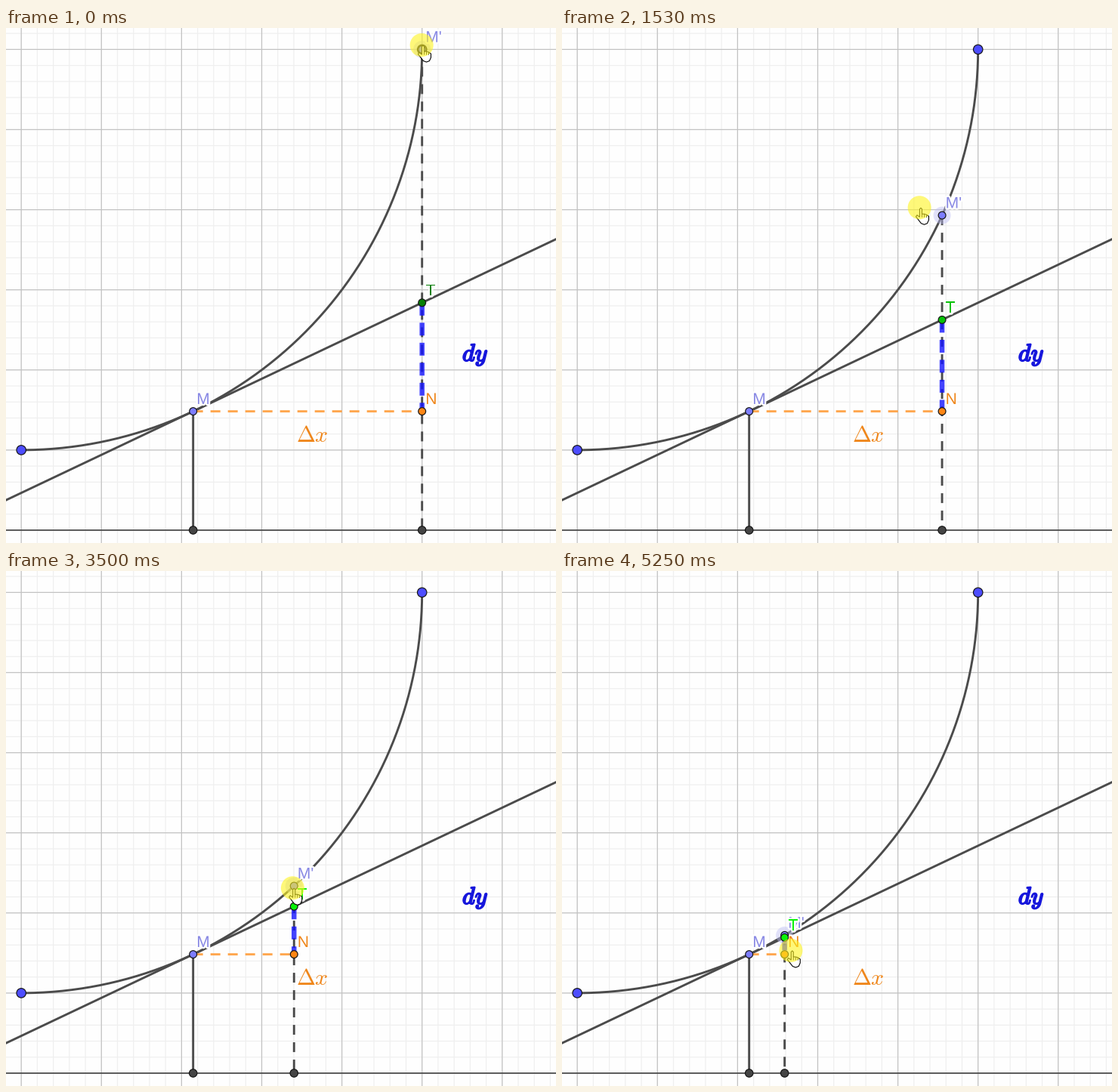
A matplotlib script that plays this animation: 728 by 682 pixels, repeating every 5320 ms.

```python
import numpy as np
import matplotlib.pyplot as plt
from matplotlib.animation import FuncAnimation
from matplotlib.patches import Circle, Polygon
from matplotlib.patheffects import withStroke

W, H, DPI = 728, 682, 64
PT = 72 / DPI                     # points per pixel
LOOP, TICK, STEPS = 5320, 40, 73

plt.rcParams.update({
    "font.family": "Liberation Sans",
    "mathtext.fontset": "cm",
    "lines.scale_dashes": False,
    "toolbar": "None",
})

# Geometry: a quarter circle five units wide, with a tangent at M
UNIT = 106.1
CX, CY, R = 20.2, 28.4, 5 * UNIT
BASE = CY + 6 * UNIT
MX = 247.7
MY = CY + np.sqrt(R**2 - (MX - CX)**2)
SLOPE = -(MX - CX) / (MY - CY)

INK = "#4b4b4b"
BLUE = "#4d4dff"
VIOLET = "#7d7dff"
LABEL = "#8888e4"
ORANGE = "#ef861a"
NAVY = "#1616dc"
PAPER = "#fefefe"

# Pointer drag in polar form around the circle's centre
KEY_STEPS = (0, 9, 21, 31, 42, 55, 72)
KEY_ANGLES = (-0.017, 0.144, 0.427, 0.615, 0.759, 0.896, 1.027)
KEY_REACH = (530, 508, 499, 511, 522, 542, 552)
LEAD = 0.006                      # the pointer runs slightly ahead of the point

HAND = np.array([
    (0, 1.5), (1.5, 0), (3, 1.5), (3, 8), (6, 8), (9, 9), (12, 11),
    (12, 16), (10, 20.5), (6, 22), (2, 20.5), (-5, 11.5), (-3.5, 9.5), (0, 12),
])

fig = plt.figure(figsize=(W / DPI, H / DPI), dpi=DPI, facecolor=PAPER)
ax = fig.add_axes([0, 0, 1, 1])
ax.set_xlim(0, W)
ax.set_ylim(H, 0)
ax.axis("off")


def line(xs, ys, color=INK, width=2.9, dash=None, **kw):
    style = (0, [d * PT for d in dash]) if dash else "-"
    return ax.plot(xs, ys, color=color, lw=width * PT, ls=style, snap=False, **kw)[0]


def dot(x, y, r, fill, z=6):
    return ax.add_patch(Circle((x, y), r, fc=fill, ec="#151515", lw=1.2 * PT, zorder=z))


def disc(r, color, alpha, z):
    return ax.add_patch(Circle((0, 0), r, fc=color, alpha=alpha, lw=0, zorder=z))


def label_spot(x, y):
    return x + 4.6, y - 9.7


def label(x, y, s, color):
    rim = [withStroke(linewidth=4.5 * PT, foreground=PAPER)]
    return ax.text(*label_spot(x, y), s, color=color, size=21 * PT,
                   path_effects=rim, zorder=5)


def draw_grid():
    for gap, color in ((UNIT / 5, "#efefef"), (UNIT, "#c2c2c2")):
        style = dict(color=color, lw=1.2 * PT, zorder=0, snap=False)
        ax.vlines(np.arange(CX % gap, W, gap), 0, H, **style)
        ax.hlines(np.arange(CY % gap, H, gap), 0, W, **style)
    line([0, W], [BASE, BASE], "#2a2a2a", 1.4, zorder=1)


draw_grid()

arc = np.linspace(0, np.pi / 2, 200)
line(CX + R * np.cos(arc), CY + R * np.sin(arc), zorder=2)
ends = np.array([-5, W + 5])
line(ends, MY + SLOPE * (ends - MX), zorder=2)
line([MX, MX], [MY, BASE], zorder=2)

dot(CX, CY + R, 6.2, BLUE)
dot(CX + R, CY, 6.2, BLUE)
dot(MX, MY, 4.9, VIOLET)
dot(MX, BASE, 5.2, "#444444")
label(MX, MY, "M", LABEL)

ax.text(384, 548.3, r"$\Delta x$", color=ORANGE, size=30 * PT, zorder=5)
ax.text(604, 441, "$dy$", color=NAVY, size=32 * PT, zorder=5,
        path_effects=[withStroke(linewidth=2 * PT, foreground=NAVY)])

# Moving parts
drop = line([], [], dash=(13, 10), zorder=2)
run = line([], [], "#ffa64d", dash=(13, 10), zorder=2)
rise = line([], [], "#0f0fff", 6.5, (17, 9.5), alpha=0.78, zorder=3)
glow = disc(11.5, "#bebef5", 0.45, 4)
foot = dot(0, 0, 5.2, "#444444")
p_dot = dot(0, 0, 4.9, VIOLET, 7)
n_dot = dot(0, 0, 4.9, "#ff8614", 7)
t_dot = dot(0, 0, 4.9, "green", 8)
p_text = label(0, 0, "M'", LABEL)
n_text = label(0, 0, "N", ORANGE)
t_text = label(0, 0, "T", "green")

hand = ax.add_patch(Polygon(HAND, fc="white", ec="black", lw=1.1 * PT,
                            joinstyle="round", zorder=10))
knuckles = [line([], [], "black", 0.9, zorder=10) for _ in range(3)]
spot = disc(15.5, "#fef420", 0.6, 11)


def place(mark, text, x, y):
    mark.set_center((x, y))
    text.set_position(label_spot(x, y))


def polar(angle, reach):
    return CX + reach * np.cos(angle), CY + reach * np.sin(angle)


def update(i):
    step = min(int((i * TICK + TICK / 2 + 5) * STEPS / LOOP), STEPS - 1)
    angle = np.interp(step, KEY_STEPS, KEY_ANGLES)
    x, y = polar(max(angle, 0), R)
    hx, hy = polar(angle + LEAD, np.interp(step, KEY_STEPS, KEY_REACH))
    ty = MY + SLOPE * (x - MX)

    drop.set_data([x, x], [y, BASE])
    run.set_data([MX, x], [MY, MY])
    rise.set_data([x, x], [ty, MY])
    foot.set_center((x, BASE))
    glow.set_center((x, y))
    place(p_dot, p_text, x, y)
    place(n_dot, n_text, x, MY)
    place(t_dot, t_text, x, ty)

    # T brightens over the first half of the drag
    green = (0.03, 0.5 + 0.45 * min(1, 2 * step / STEPS), 0.03)
    t_dot.set_facecolor(green)
    t_text.set_color(green)

    spot.set_center((hx, hy))
    hand.set_xy(HAND + (hx + 0.3, hy + 0.5))
    for k, mark in enumerate(knuckles):
        kx = hx + 3.3 + 3 * k
        mark.set_data([kx, kx], [hy + 8.5 + k * 0.6, hy + 12.5])
    return []


anim = FuncAnimation(fig, update, frames=LOOP // TICK, interval=TICK,
                     init_func=lambda: update(0), repeat=True,
                     repeat_delay=0, blit=False)
plt.show()
```
